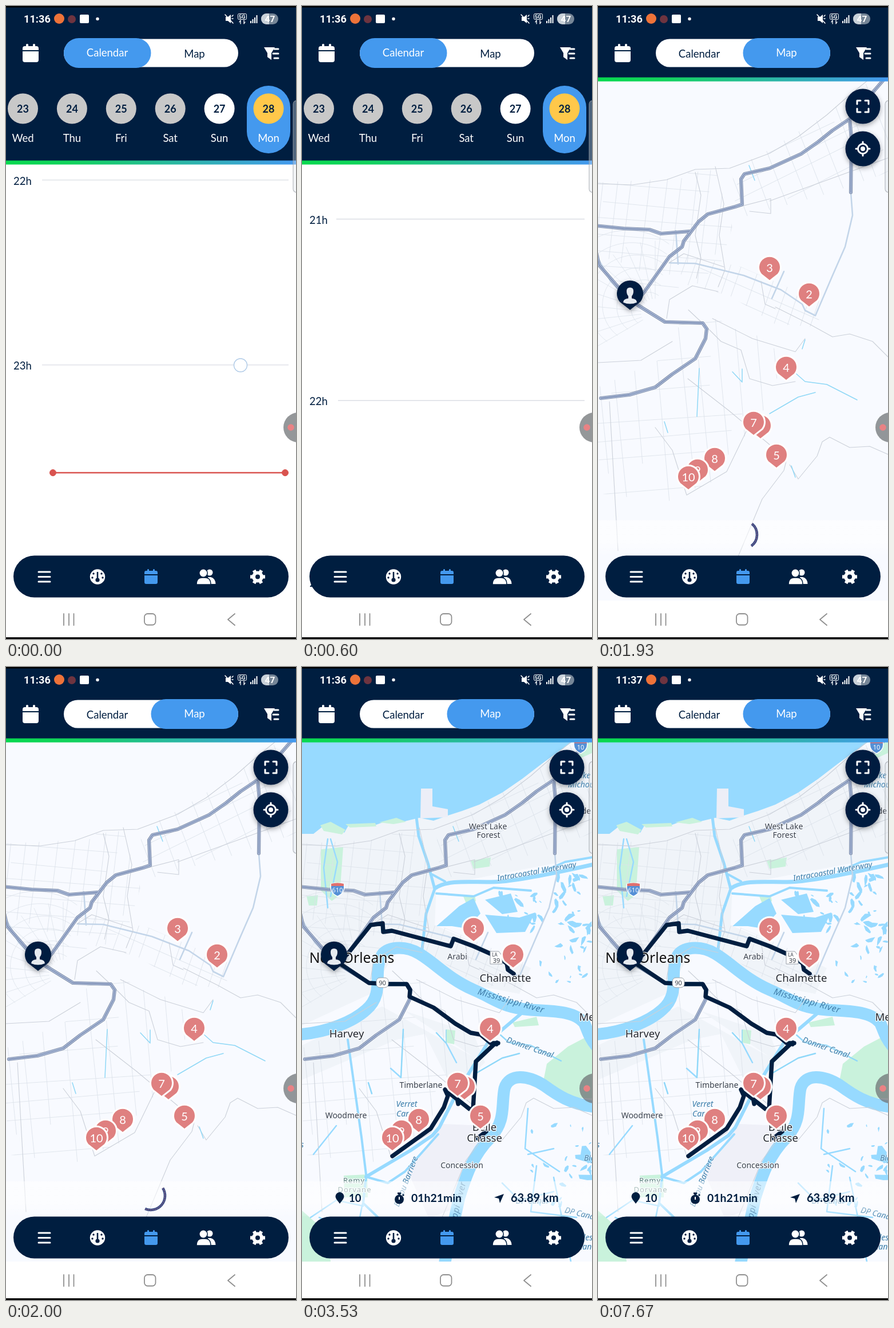
An HTML page for the animation above (8 s loop, 507 px wide and 1104 px high).

```html
<!DOCTYPE html>
<html lang="en">
<head>
<meta charset="utf-8">
<title>Route planner</title>
<style>
html,body{margin:0;width:100%;height:100%;overflow:hidden;background:#fff}
svg{display:block;width:100vw;height:100vh}
text{font-family:Lato,sans-serif;font-size:18.5px;fill:#001e40}
.mid text,text.mid{text-anchor:middle}
.bold,.bold text{font-weight:700}
.status text{font-family:Roboto,sans-serif;font-weight:700;fill:#fff}
.white{fill:#fff}
.line{fill:none;stroke-linecap:round;stroke-linejoin:round}
#labels text{font-family:"Noto Sans",sans-serif;font-size:14px;fill:#3b414b;text-anchor:middle;paint-order:stroke;stroke:#f7faff;stroke-width:2.5px;stroke-linejoin:round}
#labels .big{font-size:24.7px;fill:#111}
#labels .town{font-size:18.5px;fill:#24272d}
#labels .water{font-style:italic;fill:#3f7da8;stroke:#e9f6ff;stroke-width:1px}
#labels .river{font-size:15.5px;letter-spacing:.5px;stroke:none}
#labels .park{font-size:13px;letter-spacing:1px;fill:#577f78}
#labels .sign{font-size:11px;stroke:none}
.pin text{fill:#fff;font-size:20px}
</style>
</head>
<body>
<svg viewBox="0 0 507 1104" preserveAspectRatio="none">
<defs>
  <linearGradient id="bar"><stop stop-color="#08d94f"/><stop offset=".22" stop-color="#12d35c"/><stop offset="1" stop-color="#4599f0"/></linearGradient>
  <linearGradient id="veil" x2="0" y2="1"><stop stop-color="#fff" stop-opacity=".5"/><stop offset=".6" stop-color="#fff" stop-opacity=".6"/><stop offset="1" stop-color="#fff" stop-opacity=".1"/></linearGradient>
  <clipPath id="mapBox"><path d="M0 131H507V1037H0Z"/></clipPath>
  <clipPath id="west"><path d="M0 308L150 300L170 275L206 290L235 385L205 480L142 488L124 560L95 598L0 625Z"/></clipPath>
  <clipPath id="east"><path d="M235 285L300 250L385 198L470 135H507V290L410 325L240 372Z"/></clipPath>
  <clipPath id="bank"><path d="M0 665L105 618L145 550L155 530L265 565L325 610L300 690L200 830L120 865L0 850Z"/></clipPath>
  <clipPath id="shore"><path d="M135 430L250 455L400 520L385 560L310 555L230 505L150 485Z"/></clipPath>
  <filter id="soft" x="-30%" y="-30%" width="160%" height="170%"><feDropShadow dx="0" dy="3" stdDeviation="4" flood-opacity=".35"/></filter>
</defs>
<rect width="507" height="1104" fill="#fff"/>

<g id="agenda">
  <g id="hours"></g>
  <g id="now" stroke="#d9534f" fill="#d9534f"><path d="M82 0H488" stroke-width="2.6"/><circle cx="82" r="5.5"/><circle cx="488" r="5.5"/></g>
  <circle id="touch" cx="410" r="11.5" fill="#fff" stroke="#acc8e6" stroke-width="1.4"/>
</g>

<g id="map" clip-path="url(#mapBox)">
  <rect y="131" width="507" height="906" fill="#f8faff"/>
  <g id="land">
    <path fill="#f0f4f9" d="M0 285L205 262L507 131V330L235 382L232 450L400 525L380 570L300 555L170 486L120 570L0 625ZM0 660L140 592L300 680L180 600L300 640L320 690L265 740L215 640L165 650L0 720Z"/>
    <path fill="#eff0f8" d="M245 797L318 800L300 850L264 945L222 962L185 880Z"/>
    <path fill="#c9f2dc" d="M33 318L72 314L66 398L52 408L33 390ZM428 692L465 662L507 640V752L470 752L422 722ZM0 948L42 985L50 1037H0ZM73 887L114 885L115 925L74 925ZM478 131H507V150L485 160ZM368 620L410 610L414 625L372 628ZM252 632L268 634L266 658L252 655ZM295 338L330 332L328 348L300 352ZM8 400L28 398L26 416L12 416ZM282 400L302 398L304 408L290 420Z"/>
  </g>
  <g id="streets" class="line" stroke="#dce2ea"></g>
  <g id="water" fill="#97daff">
    <path d="M0 131H472L445 150L415 172L385 195L350 219L310 240L280 251L255 259L230 268L205 263L180 269L155 266L130 275L82 275L74 289L60 279L34 280L20 291H0Z"/>
    <path fill="#eceef7" d="M208 212H228V243L255 248V262L207 264Z"/>
    <path fill="#c9f2dc" d="M32 276L50 270L76 284L70 292L38 286ZM76 274L128 272L130 278L84 280ZM135 271L165 263L182 270L160 274Z"/>
    <g class="line" stroke="#97daff">
      <path stroke-width="21" d="M-5 641C45 637 90 618 112 598C145 570 124 535 138 506C145 487 180 485 205 500C235 518 255 543 300 563C340 580 350 594 400 598C440 600 478 600 494 622C500 636 502 646 515 662"/>
      <path stroke-width="21" d="M515 767C470 765 440 742 422 729C395 712 362 708 354 735C348 765 357 790 330 820C295 855 285 895 275 925L250 1037"/>
      <path stroke-width="5" d="M200 262L204 295L220 342L232 387L217 430L210 492"/>
      <path stroke-width="7" d="M234 385C260 368 310 378 350 374S440 360 515 343"/>
      <path stroke-width="4" d="M228 362L250 374M420 357L460 340L507 332M235 395L300 400L335 385L400 390"/>
      <path stroke-width="6" d="M386 602L327 652L297 700L268 748L240 803L228 817L190 843L112 889"/>
      <path stroke-width="4" d="M112 889L107 935L133 960M112 885L104 820L80 650M112 889L150 900L180 880L238 815"/>
      <path stroke-width="2.5" d="M177 632L173 716L155 700M107 930L95 990L30 960M45 300L38 350L45 420M50 300L62 340L50 400M345 640L362 655L400 660L453 687M300 711L350 682L380 674M116 725L122 744M235 638L252 656L270 690M395 770L390 840L450 880M410 870L400 950L480 960M440 890L470 1037M395 850L440 840M350 900L380 930L440 915M20 850L60 800M15 960L60 930L107 940"/>
    </g>
    <path d="M235 452L275 417L300 403L312 430L288 456L262 452ZM320 406L365 395L377 427L350 431ZM320 432L380 437L408 428L390 462L340 464Z"/>
    <g id="marsh"></g>
  </g>
  <g id="roads" class="line">
    <g stroke="#c3d5e9"><path stroke-width="2.6" d="M442 325L445 365L432 420L410 470L380 540L362 531L357 520L320 495L255 470L170 449L125 448M136 392L140 450M325 463L304 510M0 440L22 480L50 510"/></g>
    <g stroke="#cbd0d9" stroke-width="1.1">
      <path d="M170 290L180 330L170 400L180 440L172 475M205 280L220 345L212 400L222 460L210 490M240 352L302 336L302 362L265 358M124 448L150 432L220 455M120 545L125 512L165 488L210 498M0 310L60 312L120 303L170 285L230 283L300 257L350 228L400 190L440 155L470 131"/>
      <path d="M285 480L292 520L310 528M310 525L370 555L410 577L440 572L480 585L507 612M200 545L270 580L345 603L362 580M158 530L190 560L215 585L250 600L265 650L305 662L345 655"/>
      <path d="M157 650L228 705L330 790L325 810L287 860L245 960M335 800L350 825L383 785L392 760L405 752L440 770L475 768L507 782M100 735L130 775L155 853L225 812L260 740M0 622L75 618L130 585M20 690L35 950M507 265L300 340"/>
    </g>
    <g stroke="#8fd8f6" stroke-width="1.5"><path d="M177 632L173 716M235 638L252 656M345 640L362 655L400 660L453 687M300 711L350 682L380 674M116 725L122 744M362 582L357 598M338 802L345 822M264 278L274 304M252 633V655"/></g>
    <g id="highways"></g>
  </g>
  <path id="route" class="line" stroke="#001e40" stroke-width="7.4" d="M58 520L80 500L120 450L141 447L142 462L157 460L260 487L265 474L300 487L345 507L358 517L360 528L370 535M60 513L117 551L150 553L183 553L189 563L188 575L230 594L268 622L295 638L312 641L330 656L343 656M336 658L304 688L299 771L293 771L250 737L255 748L248 768L225 805L158 853M272 757L273 762M322 810L307 822M341 655L340 658"/>
  <g id="labels"></g>
  <g id="pins"></g>
  <g filter="url(#soft)">
    <path d="M56 530L38 516A23 23 0 1 1 74 516Z" fill="#001e40"/>
  </g>
  <path d="M44 517Q44 511 53 510V506Q50 503 50 497Q50 491 56 491T62 497Q62 503 59 506V510Q68 511 68 517Q56 522 44 517Z" fill="#e6eaf0"/>
  <rect y="897" width="507" height="61" fill="url(#veil)"/>
  <g filter="url(#soft)" fill="#001e40"><circle cx="463" cy="175" r="30.5"/><circle cx="463" cy="249" r="30.5"/></g>
  <g class="line" stroke="#fff" stroke-width="3">
    <path d="M453 171V165H459M467 165H473V171M473 179V185H467M459 185H453V179"/>
    <circle cx="463" cy="249" r="8.5"/><path d="M463 237V240M463 258V261M451 249H454M472 249H475"/>
  </g>
  <circle cx="463" cy="249" r="4" fill="#fff"/>
  <g id="spinner" class="line"><path stroke="#3b4d86" stroke-width="4.6" stroke-linecap="butt"/><path stroke="#a86b86" stroke-width="1" stroke-dasharray="2 2"/></g>
  <g id="stats" class="bold">
    <path d="M66 936L60 928A7.5 7.5 0 1 1 72 928Z" fill="#001e40"/>
    <text x="82" y="933">10</text>
    <circle cx="170" cy="928.5" r="8" fill="#001e40"/><path d="M167 918H173M170 918V922M176 920L178 922" stroke="#001e40" stroke-width="3"/><path d="M170 924V929" stroke="#fff" stroke-width="2"/>
    <text x="191" y="933" style="font-size:19.4px">01h21min</text>
    <path d="M353 919L346 935L344 927L336 925Z" fill="#001e40"/>
    <text x="365" y="933" style="font-size:20px">63.89 km</text>
  </g>
</g>

<rect id="head" width="507" fill="#001e40"/>
<rect id="stripe" width="507" height="7" fill="url(#bar)"/>
<g id="days" class="mid"></g>
<rect x="502" y="165" width="20" height="160" rx="6" fill="#dfe4ea" fill-opacity=".35" stroke="#9a9fa6" stroke-opacity=".65" stroke-width="1.3"/>
<rect width="507" height="2.5"/>

<g class="status">
  <text x="31" y="29" id="clock" style="font-size:18.2px"></text>
  <circle cx="93" cy="22" r="9" fill="#ee7339"/>
  <circle cx="115" cy="23" r="7" fill="#6e3440"/>
  <rect x="129" y="15" width="16" height="15" rx="2" fill="#fff"/>
  <circle cx="160" cy="22.5" r="2.7" fill="#fff"/>
  <path d="M384 19H388L393 15V30L388 26H384Z" fill="#fff"/>
  <path d="M383 15L397 30M395 18L397 16M395 22H397" class="line" stroke="#fff" stroke-width="1.6"/>
  <rect x="405.5" y="13.5" width="15" height="10" rx="2" fill="none" stroke="#fff"/>
  <text x="407" y="22" style="font-size:9px">5G</text>
  <path d="M410 31V25L408 28M416 25V31L418 28" class="line" stroke="#fff" stroke-width="1.3"/>
  <path d="M428 30V26M431.5 30V23M435 30V20M438.5 30V16" stroke="#fff" stroke-width="2"/>
  <rect x="446" y="13" width="30" height="19" rx="9.5" fill="#768697"/>
  <path d="M460 13H455.5A9.5 9.5 0 0 0 455.5 32H460Z" fill="#c9d1d9"/>
  <text x="461.5" y="28" class="mid" style="font-size:15.5px">47</text>
</g>

<path class="white" d="M29 79V74Q29 70 33 70H35V67Q37 65 39 67V70H47V67Q49 65 51 67V70H53Q57 70 57 74V77H29ZM29 79H57V94Q57 98 53 98H33Q29 98 29 94Z"/>
<path class="white" d="M451 72H470L464 82V94L457 89V82Z"/>
<path d="M469 75H476M467 83H476M469 91H476" class="line" stroke="#fff" stroke-width="3"/>
<rect x="101" y="57.5" width="305" height="49" rx="24.5" fill="#fff"/>
<rect id="thumb" y="56" width="152.5" height="52" rx="26" fill="#4499ee"/>
<g class="mid"><text id="tabA" x="177">Calendar</text><text id="tabB" x="329.5">Map</text></g>

<circle cx="511" cy="735" r="26" fill="#707577" fill-opacity=".75"/><circle cx="498" cy="735" r="5.8" fill="#e98284"/>
<rect x="13" y="958.5" width="481" height="73" rx="36.5" fill="#001e40"/>
<path d="M57 987H77M57 995.5H77M57 1004H77" class="line" stroke="#fff" stroke-width="3"/>
<circle cx="160" cy="995.5" r="13.2" fill="#fff"/>
<g fill="#001e40"><circle cx="160" cy="1001" r="3.6"/><circle cx="153" cy="990" r="1.7"/><circle cx="167" cy="990" r="1.7"/><circle cx="151" cy="997" r="1.7"/><circle cx="169" cy="997" r="1.7"/><path d="M158.7 987H161.3V1000H158.7Z"/></g>
<path fill="#4499ee" d="M242 991V988Q242 985 245 985H247V983Q248.5 981 250 983V985H257V983Q258.5 981 260 983V985H262Q265 985 265 988V991ZM242 993H265V1005Q265 1008 262 1008H245Q242 1008 242 1005Z"/>
<g class="white"><circle cx="356" cy="988" r="5.5"/><path d="M353 996H358Q366 998 366.5 1008H354Z"/><g stroke="#001e40" stroke-width="1.5"><circle cx="345" cy="989" r="7.2"/><path d="M333 1009Q333 997 343 997H348Q358 997 358 1009Z"/></g></g>
<g id="gear" stroke="#fff" stroke-width="6" fill="none"><circle cx="440" cy="995.5" r="7"/></g>
<g class="line" stroke="#8f8f8f" stroke-width="1.8"><path d="M101 1060V1080M110 1060V1080M118.5 1060V1080M400 1060L388 1070L400 1080"/><rect x="242" y="1060" width="19.5" height="19.5" rx="5.5"/></g>
<rect y="1101" width="507" height="3"/>
</svg>

<script>
const $ = id => document.getElementById(id);
const add = (parent, markup) => parent.insertAdjacentHTML('beforeend', markup);
const clamp = v => Math.max(0, Math.min(1, v));
const phase = (t, a, b) => clamp((t - a) / (b - a));
const smooth = u => u * u * (3 - 2 * u);
const show = (id, on) => $(id).setAttribute('opacity', +on);
const set = (node, attrs) => { for (const k in attrs) node.setAttribute(k, attrs[k]); };

let seed = 7;
const rnd = () => (seed = seed * 16807 % 2147483647) / 2147483647;

// Parallel streets, skewed by angle and broken up by seeded lengths
function grid(clip, cx, cy, angle, step, reach) {
  let d = '';
  for (let v = -reach; v < reach; v += step * (.7 + rnd() * .7)) {
    const from = -reach * (.35 + rnd() * .65), to = reach * (.35 + rnd() * .65);
    d += `M${from.toFixed()} ${v.toFixed()}L${to.toFixed()} ${(v + rnd() * 6).toFixed()}`;
  }
  add($('streets'), `<g clip-path="url(#${clip})"><path d="${d}" transform="translate(${cx} ${cy}) rotate(${angle})" stroke-width=".8"/></g>`);
}
grid('west', 120, 370, 4, 27, 140);
grid('west', 120, 370, 96, 27, 140);
grid('east', 370, 250, -27, 28, 170);
grid('east', 370, 250, 68, 30, 170);
grid('bank', 120, 720, 84, 34, 200);
grid('bank', 120, 720, -5, 44, 200);
grid('shore', 280, 500, 22, 22, 140);
grid('shore', 280, 500, 108, 25, 140);

// River-bend quarter: spokes and rings
let fan = '';
for (let a = 150; a < 275; a += 12) {
  const c = Math.cos(a * Math.PI / 180), s = Math.sin(a * Math.PI / 180);
  fan += `M${100 + 25 * c} ${535 + 25 * s}L${100 + 125 * c} ${535 + 125 * s}`;
}
for (let r = 30; r < 125; r += 18) fan += `M${100 - r} ${535 + r * .6}A${r} ${r} 0 0 1 ${100 + r * .2} ${535 - r}`;
add($('streets'), `<path clip-path="url(#west)" d="${fan}" stroke-width=".8"/>`);

// Marsh pools
function pools(x, y, w, h, n, size) {
  let d = '';
  for (let i = 0; i < n; i++) {
    const px = x + rnd() * w, py = y + rnd() * h, tilt = rnd() * 3, long = size * (.4 + rnd());
    for (let k = 0; k < 7; k++) {
      const a = k / 7 * 6.283, r = .5 + rnd() * .7;
      const u = Math.cos(a) * long * r, v = Math.sin(a) * long * .4 * r;
      d += (k ? 'L' : 'M') + (px + u * Math.cos(tilt) - v * Math.sin(tilt)).toFixed(1) + ' ' + (py + u * Math.sin(tilt) + v * Math.cos(tilt)).toFixed(1);
    }
    d += 'Z';
  }
  add($('marsh'), `<path d="${d}"/>`);
}
pools(345, 390, 75, 70, 20, 8);
pools(440, 365, 65, 130, 34, 9);
pools(415, 505, 85, 50, 10, 5);
pools(400, 790, 105, 160, 20, 6);
pools(490, 835, 17, 60, 6, 18);

const highways = [
  'M500 128L440 197L410 217L385 237L355 258L300 283L256 293L250 302L252 346L240 350L192 363L176 376L150 410L147 420L125 437L80 500L60 522',
  'M-5 383L45 388L90 390L110 397L160 393',
  'M440 197L443 230L442 325',
  'M-3 430L2 452L35 490L70 522L117 551L183 553L190 563L188 580L170 615L130 642L100 665L55 678L5 684'
];
for (const [color, width] of [['#8592ad', 6.2], ['#aebfdc', 4], ['#7686ac', 1.3]])
  add($('highways'), `<path d="${highways.join('')}" stroke="${color}" stroke-width="${width}"/>`);

const label = (x, y, s, cls = '', turn = 0) =>
  add($('labels'), `<text class="${cls}" transform="translate(${x} ${y}) rotate(${turn})">${s}</text>`);
label(87, 516, 'New Orleans', 'big');
label(355.5, 549, 'Chalmette', 'town');
label(78, 646, 'Harvey', 'town');
label(502, 617, 'Mer', 'town');
label(319, 809, 'Belle', 'town'); label(319, 828, 'Chasse', 'town');
label(325, 283, 'West Lake'); label(326, 298, 'Forest');
label(271.5, 510, 'Arabi');
label(208, 734, 'Timberlane');
label(77, 787, 'Woodmere');
label(279.5, 874, 'Concession');
label(70, 1047, 'Crown');
label(490, 194, 'Lake', 'water'); label(492, 210, 'Michoud', 'water'); label(497, 256, 'de');
label(411, 361, 'Intracoastal Waterway', 'water', -10);
label(364, 587, 'Mississippi River', 'water river', 16);
label(397, 668, 'Donner Canal', 'water', 19);
label(183, 767, 'Verret', 'water'); label(183, 784, 'Canal', 'water');
label(186, 899, 'Bayou Barriere', 'water', -69);
label(272, 958, 'Mississippi River', 'water river', -76);
label(402, 936, 'DP Canal', 'water');
label(486, 958, 'DP Canal', 'water', 14);
label(503, 861, 'Big', 'water'); label(500, 1000, 'les', 'water'); label(500, 1016, 'Canal', 'water');
label(0, 838, 's', 'water');
label(91, 900, 'Remy', 'park'); label(92, 916, 'Dorvane', 'park');

function shield(x, y, s) {
  add($('labels'), `<path d="M${x - 11} ${y - 10}Q${x} ${y - 13} ${x + 11} ${y - 10}Q${x + 15} ${y + 5} ${x} ${y + 12}Q${x - 15} ${y + 5} ${x - 11} ${y - 10}Z" fill="#5590d6" stroke="#fff" stroke-width="1.5"/>
  <path d="M${x - 11} ${y - 6}V${y - 10}Q${x} ${y - 13} ${x + 11} ${y - 10}V${y - 6}Z" fill="#e0706f"/>
  <text class="sign" x="${x}" y="${y + 5}" style="fill:#fff">${s}</text>`);
}
shield(62, 388, '610');
shield(487, 139, '10');
add($('labels'), `<rect x="130" y="542" width="21" height="17" rx="6" fill="#fff" stroke="#9aa0a8"/><text class="sign" x="140.5" y="555">90</text>
<path d="M329 496H344L350 504V518H329Z" fill="#fff" stroke="#9aa0a8"/><text class="sign" x="337" y="505" style="font-size:8px">LA</text><text class="sign" x="340" y="516">39</text>`);

const pins = [[3, 300, 456], [2, 369, 502], [4, 329, 630], [6, 284, 732], [7, 272, 726], [5, 312, 783], [8, 204, 789], [9, 174, 809], [10, 158, 821]];
for (const [n, x, y] of pins)
  add($('pins'), `<g class="pin mid" transform="translate(${x} ${y})"><path d="M0 22L-14 11A18 18 0 1 1 14 11Z" fill="#df8080" stroke="#fff" stroke-width="6" stroke-linejoin="round" paint-order="stroke"/><text y="8">${n}</text></g>`);

add($('days'), '<rect x="421" y="139" width="76" height="118" rx="38" fill="#4499ee"/>');
['Wed', 'Thu', 'Fri', 'Sat', 'Sun', 'Mon'].forEach((day, i) => {
  const x = 29.5 + i * 85.9;
  const fill = i < 4 ? '#c8c8c8' : i < 5 ? '#fff' : '#ffc84a';
  add($('days'), `<circle cx="${x}" cy="179" r="26.5" fill="${fill}"/><text class="bold" x="${x}" y="185.5" style="font-size:18px">${23 + i}</text><text x="${x}" y="237" style="fill:#fff">${day}</text>`);
});
for (let h = 20; h < 24; h++)
  add($('hours'), `<g><path d="M${h === 21 ? 60 : 63} 0H494" stroke="#e0e2e8" stroke-width="1.6"/><text x="13" y="8">${h}h</text></g>`);
for (let a = 30; a < 360; a += 60)
  add($('gear'), `<path d="M440 987V982.5" transform="rotate(${a} 440 995.5)"/>`);

function drawAgenda(t) {
  const u = 1 - (1 - phase(t, 130, 800)) ** 2.5;
  const shift = 404 * u, gap = 322.5 - 6 * clamp(u * 2);
  const top = 303.5 + shift;
  [...$('hours').children].forEach((row, i) => set(row, { transform: `translate(0 ${top + (i - 2) * gap})` }));
  set($('now'), { transform: `translate(0 ${top + gap * 1.583})` });
  set($('touch'), { cy: 626.5 + shift });
  show('touch', t < 330);
}

function drawSpinner(t) {
  const start = -50 + .25 * (t - 1930);
  const sweep = 20 + 250 * smooth(phase(t, 1700, 2300));
  const at = a => `${253 + 25 * Math.cos(a * Math.PI / 180)} ${922 + 25 * Math.sin(a * Math.PI / 180)}`;
  const d = `M${at(start)}A25 25 0 ${+(sweep > 180)} 1 ${at(start + sweep)}`;
  for (const arc of $('spinner').children) set(arc, { d });
  show('spinner', t >= 1670 && t < 2400);
}

function draw(t) {
  const onMap = t >= 1470;
  $('clock').textContent = t < 6200 ? '11:36' : '11:37';
  const slide = smooth(phase(t, 1270, 1470)), active = slide > .5;
  set($('thumb'), { x: 101 + 152.5 * slide });
  set($('tabA'), { y: active ? 89.5 : 88, style: `fill:${active ? '#001e40' : '#fff'}` });
  set($('tabB'), { y: active ? 88 : 89.5, style: `fill:${active ? '#fff' : '#001e40'}` });

  const bottom = onMap ? 125 : 270;
  set($('head'), { height: bottom });
  set($('stripe'), { y: bottom - .5 });
  show('days', !onMap);
  show('agenda', !onMap);
  show('map', onMap);
  drawAgenda(t);

  show('streets', phase(t, 1670, 1870));
  show('roads', phase(t, 1670, 1870));
  show('pins', t >= 1600);
  const tiles = phase(t, 2070, 2200);
  for (const id of ['land', 'water', 'labels']) show(id, tiles);
  drawSpinner(t);
  show('route', t >= 2400);
  show('stats', t >= 2470);
}

const origin = performance.now();
function tick() {
  draw((performance.now() - origin) % 8000);
  requestAnimationFrame(tick);
}
tick();
</script>
</body>
</html>
```
